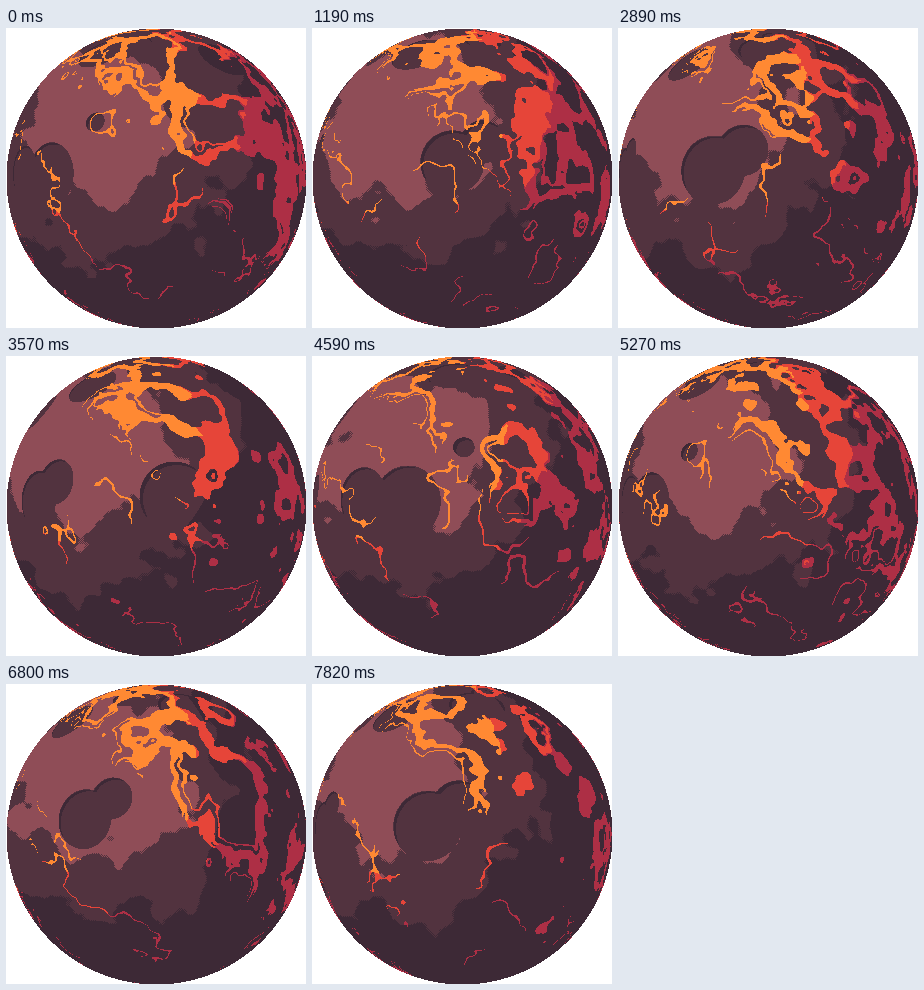
An HTML page with a canvas for the animation above (7990 ms loop, 300 by 300 pixels).

```html
<!DOCTYPE html>
<html lang="en">
<head>
<meta charset="utf-8">
<title>Lava planet</title>
<style>
  html, body { margin: 0; width: 100%; height: 100%; overflow: hidden; background: #fff; }
  canvas { display: block; width: 100vw; height: 100vh; image-rendering: pixelated; }
</style>
</head>
<body>
<canvas id="planet" width="300" height="300"></canvas>
<script>
const SIZE = 300, STEP_MS = 170, STEPS = 47, STEPS_PER_TURN = 60;
const SEED = 0.4, LIGHT = 0.3;

const ctx = document.getElementById('planet').getContext('2d');
const image = ctx.createImageData(SIZE, SIZE);
const out = new Uint32Array(image.data.buffer);

// 0xRRGGBB to the little-endian ABGR of the image buffer
const color = rgb =>
  (0xff000000 | (rgb & 255) << 16 | (rgb & 0xff00) | rgb >> 16) >>> 0;
const LAND = [0x8f4d57, 0x52333f, 0x3d2936].map(color);
const LAVA = [0xff8933, 0xe64539, 0xad2f45].map(color);

const fract = x => x - Math.floor(x);

// Random lattice that tiles every w by h cells
function lattice(w, h) {
  const values = new Float64Array(w * h);
  for (let y = 0; y < h; y++)
    for (let x = 0; x < w; x++)
      values[y * w + x] = fract(Math.sin(x * 12.9898 + y * 78.233) * 15.5453 * SEED);
  return { w, h, values };
}

const landGrid = lattice(10, 10);
const lavaGrid = lattice(20, 10);
const craterGrid = lattice(4, 4);

function noise({ w, h, values }, x, y) {
  const ix = Math.floor(x), iy = Math.floor(y);
  const fx = x - ix, fy = y - iy;
  const x0 = ix % w, x1 = (ix + 1) % w;
  const r0 = iy % h * w, r1 = (iy + 1) % h * w;
  const sx = fx * fx * (3 - 2 * fx), sy = fy * fy * (3 - 2 * fy);
  const top = values[r0 + x0] + (values[r0 + x1] - values[r0 + x0]) * sx;
  const bottom = values[r1 + x0] + (values[r1 + x1] - values[r1 + x0]) * sx;
  return top + (bottom - top) * sy;
}

function fbm(grid, x, y, octaves) {
  let sum = 0, scale = 0.5;
  for (let i = 0; i < octaves; i++) {
    sum += noise(grid, x, y) * scale;
    x *= 2;
    y *= 2;
    scale /= 2;
  }
  return sum;
}

// 0 inside the round hole of a cell, 1 outside, with a narrow soft edge
function hole(x, y) {
  const row = Math.floor(y);
  x += row * 0.31;
  const col = Math.floor(x);
  const h = craterGrid.values[row % 4 * 4 + col % 4];
  const center = 0.25 + h * 0.5, r = h * 0.25;
  const dist = Math.hypot(x - col - center, y - row - center);
  if (dist >= r) return 1;
  const t = Math.max(0, (dist - 0.9 * r) / (0.1 * r));
  return t * t * (3 - 2 * t);
}

function crater(u, v, shift) {
  const x = u * 3.5 + shift, y = v * 3.5;
  return 1 - hole(x + 11, y + 11) * hole(x + 12, y + 12);
}

// Everything about a pixel that does not depend on time
const pixels = [];
for (let j = 0; j < SIZE; j++) {
  for (let i = 0; i < SIZE; i++) {
    const x = i / SIZE, y = j / SIZE;
    if (Math.hypot(x - 0.5, y - 0.5) > 0.49999) continue;
    const cx = 2 * x - 1, cy = 2 * y - 1;
    const z = Math.sqrt(Math.max(0, 1 - cx * cx - cy * cy));
    const warp = fbm(landGrid, x, y, 3);
    pixels.push({
      index: j * SIZE + i,
      u: cx / (z + 1) / 2 + 0.5,
      v: cy / (z + 1) / 2 + 0.5,
      light: Math.hypot(x - LIGHT, y - LIGHT),
      landX: x * 10 + warp,
      landY: y * 10 + warp,
      dither: (i + j) % 2 ? 0 : 2 / SIZE
    });
  }
}

function shade(p, turn) {
  const { u, v, light } = p;

  const heat = fbm(lavaGrid, u * 10 + turn * 20, v * 10, 4);
  const river = fbm(lavaGrid, u + heat * 2.5, v + heat * 2.5, 4);
  if (river >= 0.579) {
    const dark = light * light * 0.4 * (1 - river);
    return LAVA[dark > 0.036 ? 2 : dark > 0.019 ? 1 : 0];
  }

  const depth = crater(u, v, turn * 8);
  if (depth >= 0.5) {
    const offset = (LIGHT - 0.5) * 0.03;
    const rim = crater(u + offset, v + offset, turn * 8) < depth - (0.5 - light) * 2;
    return LAND[rim || light > 0.4 ? 2 : 1];
  }

  const dark = light + fbm(landGrid, p.landX + turn * 20, p.landY, 3) * 0.3 - p.dither;
  return LAND[dark >= 0.6 ? 2 : dark >= 0.4 ? 1 : 0];
}

let shown = -1;
function draw(now) {
  const step = Math.floor(now / STEP_MS) % STEPS;
  if (step !== shown) {
    shown = step;
    for (const p of pixels) out[p.index] = shade(p, step / STEPS_PER_TURN);
    ctx.putImageData(image, 0, 0);
  }
  requestAnimationFrame(draw);
}
draw(0);
</script>
</body>
</html>
```
